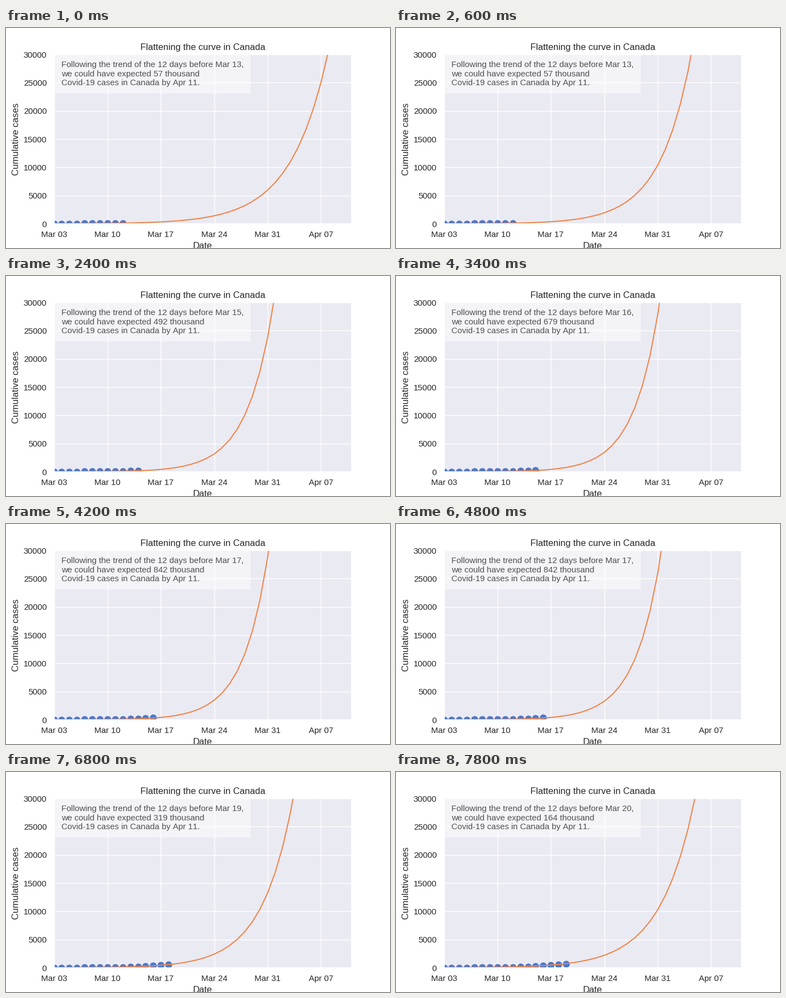
These frames come from a looping animation (700x400 px, 8 s). A matplotlib script:

```python
import numpy as np
import matplotlib.pyplot as plt
from matplotlib.animation import FuncAnimation

FIRST_DAY = 13      # March day shown at the start
STEPS = 5           # frames per day
FRAMES = 40
INTERVAL = 200

# Thousands of cases predicted for Apr 11, one per day
predicted = [57, 210, 492, 679, 842, 621, 319, 164, 103]

days = np.arange(40)    # days since Mar 03

plt.rcParams.update({
    'font.family': 'Liberation Sans',
    'text.kerning_factor': 6,
    'text.color': '.15',
    'axes.labelcolor': '.15',
    'xtick.color': '.15',
    'ytick.color': '.15',
    'axes.axisbelow': True,
})


def cases(t):
    """Slow exponential start, then a steady daily rise."""
    return np.maximum(48.7 * np.exp(.183 * (t - 3.5)), 97.4 * (t - 9))


def curve(k):
    """Exponential from the level on the last known day to the prediction."""
    last = FIRST_DAY + k - 4
    level = 4.796 + .1538 * k + .02856 * k**2 - .002 * k**3
    end = np.log(predicted[k] * 1000)
    rate = (end - level) / (days[-1] - last)
    return np.exp(end + rate * (days - days[-1]))


fig, ax = plt.subplots(figsize=(7, 4), dpi=100)
fig.subplots_adjust(left=.125, right=.9, bottom=.11, top=.88)
ax.set_facecolor('#EAEAF2')
ax.grid(color='white', lw=1)
for spine in ax.spines.values():
    spine.set(color='white', linewidth=1.25)
ax.tick_params(length=6, left=False, bottom=False, labelsize=11)

ax.set_xlim(0, 39)
ax.set_ylim(0, 30000)
ax.set_xticks(range(0, 39, 7),
              ['Mar 03', 'Mar 10', 'Mar 17', 'Mar 24', 'Mar 31', 'Apr 07'])
ax.set_yticks(range(0, 30001, 5000))
ax.set_xlabel('Date', fontsize=12)
ax.set_ylabel('Cumulative cases', fontsize=12)
ax.set_title('Flattening the curve in Canada', fontsize=12)

dots, = ax.plot([], [], 'o', color='#4878D0', ms=8)
line, = ax.plot([], [], color='#EE854A', lw=1.5)
note = ax.text(.025, .96, '', transform=ax.transAxes, va='top', fontsize=11,
               alpha=.8, zorder=3,
               bbox=dict(boxstyle='square,pad=0.8', fc='white', ec='none',
                         alpha=.5))


def update(i):
    k, step = divmod(i, STEPS)
    mix = step / STEPS
    line.set_data(days, (1 - mix) * curve(k) + mix * curve(k + 1))
    day = FIRST_DAY + k
    known = days[:day - 3]
    dots.set_data(known, cases(known))
    note.set_text(f'Following the trend of the 12 days before Mar {day},\n'
                  f'we could have expected {predicted[k]} thousand\n'
                  'Covid-19 cases in Canada by Apr 11.')
    return dots, line, note


anim = FuncAnimation(fig, update, frames=FRAMES, interval=INTERVAL,
                     repeat=True, repeat_delay=0)
plt.show()
```
